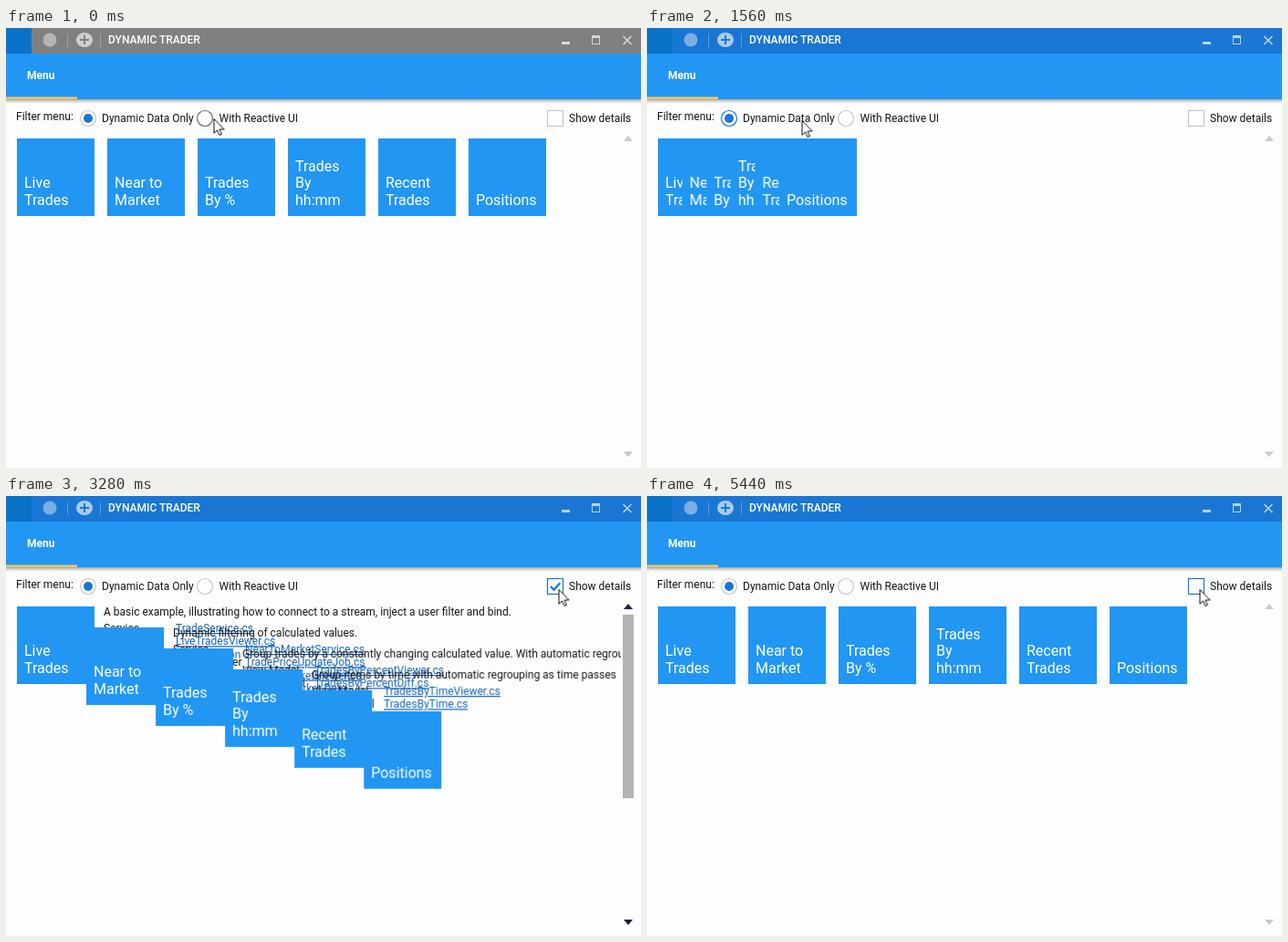
An HTML page that plays this animation: 696 px wide and 482 px high, repeating every 5.92 s.

```html
<!DOCTYPE html>
<html lang="en">
<head>
<meta charset="utf-8">
<title>Dynamic Trader</title>
<style>
  html, body { margin: 0; width: 100%; height: 100%; overflow: hidden; background: #fdfdfd; }
  svg { display: block; }
  text { font: 12px Roboto, Arial, sans-serif; fill: #161616; }
  .title { font-weight: 500; fill: #fff; }
  .tab { font-weight: 700; fill: #fff; }
  .tile text { font-size: 16px; fill: #fff; }
  .link { fill: #1565c0; }
  .under { text-decoration: underline; }
  .ring { fill: #fff; stroke: #c6c6c6; stroke-width: 1.2; }
  .dot { fill: #1976d2; transform-box: fill-box; transform-origin: center; }
</style>
</head>
<body>
<svg id="stage" width="696" height="482" viewBox="0 0 696 482">
  <defs>
    <linearGradient id="shade" x2="0" y2="1">
      <stop offset="0" stop-opacity=".5"/>
      <stop offset=".4" stop-opacity=".22"/>
      <stop offset="1" stop-opacity="0"/>
    </linearGradient>
    <clipPath id="view"><rect y="110" width="674" height="366"/></clipPath>
  </defs>
  <rect width="696" height="482" fill="#fdfdfd"/>

  <rect y="77" width="696" height="6" fill="url(#shade)"/>
  <rect y="28" width="696" height="50" fill="#2196f3"/>
  <rect y="75.5" width="78" height="2.5" fill="#ffc95c"/>
  <text class="tab" x="23" y="56">Menu</text>

  <rect id="bar" width="696" height="28" fill="#808080"/>
  <rect width="28" height="28" fill="#0a73c8"/>
  <g fill="#fff">
    <circle cx="48" cy="13" r="7.5" opacity=".42"/>
    <path opacity=".62" fill-rule="evenodd" d="M77 13a9 8 0 1 0 18 0a9 8 0 1 0 -18 0ZM85 8h2v4h4v2h-4v4h-2v-4h-4v-2h4Z"/>
    <path opacity=".28" d="M67 6h1v15h-1ZM103 6h1v15h-1Z"/>
    <g opacity=".68">
      <rect x="609" y="15" width="9" height="3"/>
      <path fill-rule="evenodd" d="M642 8h9v10h-9ZM643 11v6h7v-6Z"/>
      <path d="M676.5 9l9 9M685.5 9l-9 9" stroke="#fff" stroke-width="1.6"/>
    </g>
  </g>
  <text class="title" x="112" y="17">DYNAMIC TRADER</text>

  <text x="11" y="101">Filter menu:</text>
  <circle id="ringA" class="ring" cx="90" cy="99" r="8.5"/>
  <circle id="dotA" class="dot" cx="90" cy="99" r="5"/>
  <text x="105" y="103">Dynamic Data Only</text>
  <circle id="ringB" class="ring" cx="218" cy="99" r="8.5"/>
  <circle id="dotB" class="dot" cx="218" cy="99" r="5"/>
  <text x="233.5" y="103">With Reactive UI</text>
  <rect id="box" class="ring" x="593.5" y="90.5" width="17" height="17"/>
  <path id="tick" d="M597 99l3.6 3.8l6.6-7.6" fill="none" stroke="#1976d2" stroke-width="2.2"/>
  <text x="617" y="103">Show details</text>

  <g clip-path="url(#view)">
    <g id="dynamic"></g>
    <g id="reactive"></g>
  </g>

  <rect id="thumb" x="676" y="130" width="12" height="201" fill="#b4b4b4"/>
  <path id="arrows" d="M677 124h10l-5-6ZM677 464h10l-5 6Z" fill="#c9c9cf"/>
  <path id="cursor" d="M.5.5V16.3L4.1 12.9L6.5 18.5L8.9 17.4L6.6 12H11.6Z" fill="#fff" stroke="#111" stroke-width="1"/>
</svg>

<script>
const LOOP = 5920, LEFT = 12, TOP = 121, PITCH = 99;
const GREY = '#c6c6c6', HOVER = '#666', BLUE = '#1976d2';
const $ = id => document.getElementById(id);

const menu = [
  [['Live', 'Trades'],
    'A basic example, illustrating how to connect to a stream, inject a user filter and bind.',
    [['Service', 'TradeService.cs'], ['View Model', 'LiveTradesViewer.cs'], ['Blog', 'Ui Integration', 'link']]],
  [['Near to', 'Market'],
    'Dynamic filtering of calculated values.',
    [['Service', 'NearToMarketService.cs'], ['Rates Updater', 'TradePriceUpdateJob.cs'],
      ['View Model', 'NearToMarketViewer.cs'], ['Blog i', 'Manage Market Data'],
      ['Blog ii', 'Filter on calculated values']]],
  [['Trades', 'By %'],
    'Group trades by a constantly changing calculated value. With automatic regrouping.',
    [['View Model', 'TradesByPercentViewer.cs'], ['Group Model', 'TradesByPercentDiff.cs']]],
  [['Trades', 'By', 'hh:mm'],
    'Group items by time with automatic regrouping as time passes',
    [['View Model', 'TradesByTimeViewer.cs'], ['Group Model', 'TradesByTime.cs']]],
  [['Recent', 'Trades']],
  [['Positions']]
];

function add(parent, name, attrs = {}, label = '') {
  const el = document.createElementNS('http://www.w3.org/2000/svg', name);
  for (const key in attrs) el.setAttribute(key, attrs[key]);
  el.textContent = label;
  return parent.appendChild(el);
}

// Rows are [time, value, easing]; without an easing the value holds until the next row.
function track(el, prop, rows) {
  const last = rows[rows.length - 1];
  const frames = [...rows, [LOOP, last[1]]].map(([time, value, easing = 'steps(1, end)']) =>
    ({ offset: time / LOOP, [prop]: value, easing }));
  el.animate(frames, { duration: LOOP, iterations: Infinity });
}

const at = (x, y) => `translate(${x}px, ${y}px)`;
const slot = (col, row) => at(LEFT + PITCH * col, TOP + PITCH * row);

function addTile(parent, lines) {
  const item = add(parent, 'g');
  const tile = add(item, 'g', { class: 'tile' });
  add(tile, 'rect', { width: 85, height: 85, fill: '#2196f3' });
  lines.forEach((line, i) =>
    add(tile, 'text', { x: 8, y: 73 - 18.75 * (lines.length - 1 - i) }, line));
  return item;
}

function addDetails(item, about, links) {
  const info = add(item, 'g');
  add(info, 'text', { x: 95, y: 10 }, about);
  links.forEach(([label, target, style = 'link under'], i) => {
    const y = 28 + 14.25 * i;
    add(info, 'text', { x: 95, y }, label);
    add(info, 'text', { x: 174, y, class: style }, target);
  });
  track(info, 'opacity', [[0, 0], [3230, 1], [5200, 0]]);
}

menu.forEach(([lines, about, links], i) => {
  const item = addTile($('dynamic'), lines);
  if (about) addDetails(item, about, links);
  track(item, 'transform', [
    [0, slot(i, 0)],
    [1500, slot(0, 0)], [1504, slot(0, 0), 'linear'], [1716, slot(i, 0)],
    [3230, slot(i, 0), 'linear'], [3450, slot(0, i)],
    [5225, slot(0, i), 'linear'], [5435, slot(i, 0)]
  ]);
});

[['Live', 'Trades'], ['Log Entry']].forEach((lines, i) =>
  track(addTile($('reactive'), lines), 'transform',
    [[0, slot(0, 0)], [305, slot(0, 0), 'linear'], [517, slot(i, 0)]]));

track($('dynamic'), 'opacity', [[0, 1], [280, 0], [1500, 1]]);
track($('reactive'), 'opacity', [[0, 0], [280, 1], [1500, 0]]);

track($('bar'), 'fill', [[0, '#808080'], [40, BLUE]]);
track($('ringA'), 'stroke', [[0, GREY], [1000, HOVER], [1400, BLUE], [3080, GREY]]);
track($('ringB'), 'stroke', [[0, HOVER], [40, BLUE], [1400, GREY]]);
track($('dotA'), 'transform', [
  [0, 'scale(1)'], [40, 'scale(1)', 'linear'], [180, 'scale(0)'],
  [1400, 'scale(0)', 'linear'], [1540, 'scale(1)']
]);
track($('dotB'), 'transform', [
  [0, 'scale(0)'], [40, 'scale(0)', 'linear'], [180, 'scale(1)'],
  [1400, 'scale(1)', 'linear'], [1540, 'scale(0)']
]);
track($('box'), 'stroke', [[0, GREY], [2370, HOVER], [3080, BLUE]]);
track($('tick'), 'opacity', [[0, 0], [3080, 0, 'linear'], [3220, 1], [5200, 0]]);
track($('thumb'), 'opacity', [[0, 0], [3230, 1], [5200, 0]]);
track($('arrows'), 'fill', [[0, '#c9c9cf'], [3230, '#20203f'], [5200, '#c9c9cf']]);
track($('cursor'), 'transform', [
  [0, at(227.5, 99)],
  [900, at(227.5, 99), 'ease-in-out'], [1160, at(169.5, 101)],
  [2020, at(169.5, 101), 'ease-in-out'], [2400, at(605.5, 102)]
]);
</script>
</body>
</html>
```
